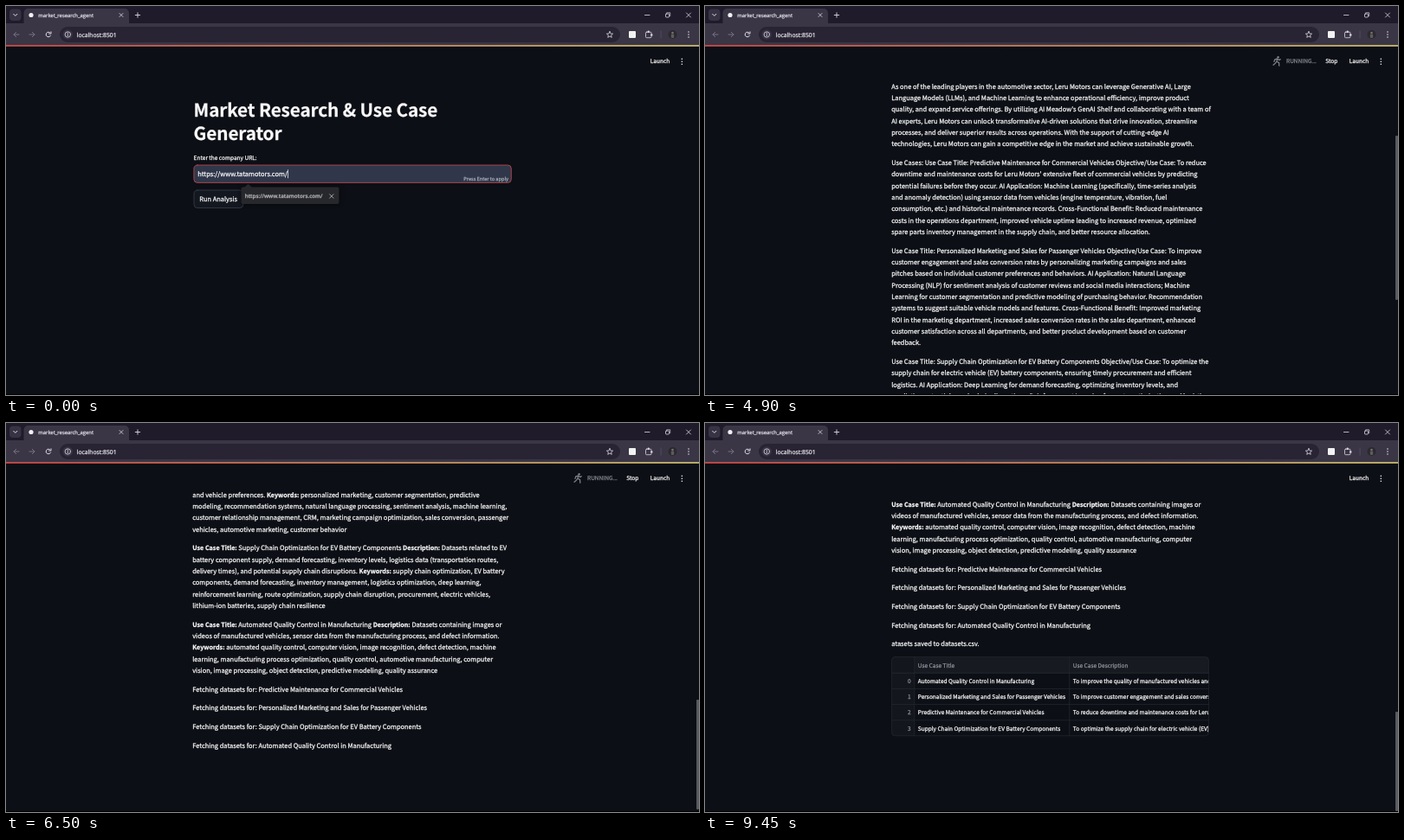
Animation of 800 by 450 pixels, one loop 10 s. Source, as an HTML page with a canvas:

```html
<!DOCTYPE html>
<html lang="en">
<head>
<meta charset="utf-8">
<title>market_research_agent</title>
<style>
html, body { margin: 0; width: 100%; height: 100%; overflow: hidden; background: #0c0f15; }
canvas { display: block; width: 800px; height: 450px; }
</style>
</head>
<body>
<canvas id="stage" width="800" height="450"></canvas>
<script>
const ctx = document.getElementById('stage').getContext('2d');
const LOOP = 10000, STEP = 50;
const BG = '#0c0f15', INK = '#fafafa', RED = '#e0544c', LINK = '#3d95e6';
const LINE = 13.333, GAP = 8.333, BODY = 8.333, STRONG = 8.04, SMALL = 7.29;
const SITE = 'https://www.tatamotors.com/';

// The Latin letters of Noto Sans CJK are drawn 1.117 times larger than their nominal size.
const sans = (px, weight = 400) =>
  `${weight} ${px / 1.117}px "Noto Sans CJK SC", "Noto Sans CJK JP", "Noto Sans CJK KR", "Open Sans", sans-serif`;
const chromeFont = (px, weight = 400) => `${weight} ${px}px "Open Sans", "Noto Sans", sans-serif`;

const INTRO = [
  ['Introductory Paragraph:'],
  ['GenAI & ML Use Cases for Leru Motors'],
  ['As one of the leading players in the automotive sector, Leru Motors can leverage Generative AI, Large',
   'Language Models (LLMs), and Machine Learning to enhance operational efficiency, improve product',
   "quality, and expand service offerings. By utilizing AI Meadow's GenAI Shelf and collaborating with a team of",
   'AI experts, Leru Motors can unlock transformative AI-driven solutions that drive innovation, streamline',
   'processes, and deliver superior results across operations. With the support of cutting-edge AI',
   'technologies, Leru Motors can gain a competitive edge in the market and achieve sustainable growth.']
];
const USE_CASES = [
  ['Use Cases: Use Case Title: Predictive Maintenance for Commercial Vehicles Objective/Use Case: To reduce',
   "downtime and maintenance costs for Leru Motors' extensive fleet of commercial vehicles by predicting",
   'potential failures before they occur. AI Application: Machine Learning (specifically, time-series analysis',
   'and anomaly detection) using sensor data from vehicles (engine temperature, vibration, fuel',
   'consumption, etc.) and historical maintenance records. Cross-Functional Benefit: Reduced maintenance',
   'costs in the operations department, improved vehicle uptime leading to increased revenue, optimized',
   'spare parts inventory management in the supply chain, and better resource allocation.'],
  ['Use Case Title: Personalized Marketing and Sales for Passenger Vehicles Objective/Use Case: To improve',
   'customer engagement and sales conversion rates by personalizing marketing campaigns and sales',
   'pitches based on individual customer preferences and behaviors. AI Application: Natural Language',
   'Processing (NLP) for sentiment analysis of customer reviews and social media interactions; Machine',
   'Learning for customer segmentation and predictive modeling of purchasing behavior. Recommendation',
   'systems to suggest suitable vehicle models and features. Cross-Functional Benefit: Improved marketing',
   'ROI in the marketing department, increased sales conversion rates in the sales department, enhanced',
   'customer satisfaction across all departments, and better product development based on customer',
   'feedback.'],
  ['Use Case Title: Supply Chain Optimization for EV Battery Components Objective/Use Case: To optimize the',
   'supply chain for electric vehicle (EV) battery components, ensuring timely procurement and efficient',
   'logistics. AI Application: Deep Learning for demand forecasting, optimizing inventory levels, and',
   'predicting potential supply chain disruptions. Reinforcement Learning for route optimization and logistics',
   'planning. Cross-Functional Benefit: Reduced procurement costs, improved production planning in the',
   'manufacturing department, lower inventory costs, and a more resilient supply chain for all electric',
   'vehicle programs.'],
  ['Use Case Title: Automated Quality Control in Manufacturing Objective/Use Case: To improve the quality',
   'of manufactured vehicles and reduce defects by automating inspection. AI Application: Computer Vision',
   'for detecting defects in images and videos of parts on the line, with Deep Learning models trained on',
   'labeled examples. Cross-Functional Benefit: Fewer defects in the manufacturing department, lower',
   'warranty costs in the finance department, higher customer satisfaction, and faster feedback for the',
   'engineering teams.']
];
const DATASETS = [
  ['Keywords and descriptions for dataset search:'],
  ['**Use Case Title:** Predictive Maintenance for Commercial Vehicles **Description:** Datasets containing',
   'sensor data from vehicles, maintenance records, failure logs, and operating conditions of commercial',
   'fleets, with time stamps for each of the recorded events. **Keywords:** predictive maintenance, sensor',
   'data, time-series analysis, anomaly detection, machine learning, failure forecasting, regression,',
   'classification, IoT, fleet management, Leru Motors, vehicle diagnostics, maintenance costs, downtime',
   'reduction'],
  ['**Use Case Title:** Personalized Marketing and Sales for Passenger Vehicles **Description:** Datasets containing',
   'customer demographics, purchase history, online behavior, social media interactions, customer reviews,',
   'and vehicle preferences. **Keywords:** personalized marketing, customer segmentation, predictive',
   'modeling, recommendation systems, natural language processing, sentiment analysis, machine learning,',
   'customer relationship management, CRM, marketing campaign optimization, sales conversion, passenger',
   'vehicles, automotive marketing, customer behavior'],
  ['**Use Case Title:** Supply Chain Optimization for EV Battery Components **Description:** Datasets related to EV',
   'battery component supply, demand forecasting, inventory levels, logistics data (transportation routes,',
   'delivery times), and potential supply chain disruptions. **Keywords:** supply chain optimization, EV battery',
   'components, demand forecasting, inventory management, logistics optimization, deep learning,',
   'reinforcement learning, route optimization, supply chain disruption, procurement, electric vehicles,',
   'lithium-ion batteries, supply chain resilience'],
  ['**Use Case Title:** Automated Quality Control in Manufacturing **Description:** Datasets containing images or',
   'videos of manufactured vehicles, sensor data from the manufacturing process, and defect information.',
   '**Keywords:** automated quality control, computer vision, image recognition, defect detection, machine',
   'learning, manufacturing process optimization, quality control, automotive manufacturing, computer',
   'vision, image processing, object detection, predictive modeling, quality assurance']
];
const TITLES = [
  'Predictive Maintenance for Commercial Vehicles',
  'Personalized Marketing and Sales for Passenger Vehicles',
  'Supply Chain Optimization for EV Battery Components',
  'Automated Quality Control in Manufacturing'
];
const TABLE_AT = 6650;
const COLUMNS = [
  { head: 'Use Case Title', width: 179, cells: [TITLES[3], TITLES[1], TITLES[0], TITLES[2]] },
  { head: 'Use Case Description', width: 260, cells: [
    'To improve the quality of manufactured vehicles and reduce defects by automating inspection',
    'To improve customer engagement and sales conversion rates by personalizing marketing',
    "To reduce downtime and maintenance costs for Leru Motors' extensive fleet of vehicles",
    'To optimize the supply chain for electric vehicle (EV) battery components'] },
  { head: 'Keywords', width: 260, cells: [
    'computer vision, deep learning, quality control, defect and image recognition',
    'personalized marketing, customer segmentation, predictive modeling, recommendation systems',
    'predictive maintenance, anomaly detection, machine learning, sensor analysis',
    'demand forecasting, inventory management, logistics optimization, supply chain optimization'] },
  { head: 'Dataset Name', width: 260, cells: [
    ' surface-defect-detection-dataset, Acne | Computer Vision, Bitcoin Hist. KLines | All Intervals',
    'Books Dataset, Boston House Prices, Comprehensive Diabetes Clinical Dataset(100k rows)',
    'Air Passenger Data for Time Series Analysis, Border Crossing Entry Data, Cityscapes Image Pairs',
    'BigBasket Entire Product List (~28K datapoints) , Brewery Operations and Market Analysis'] },
  { head: 'Dataset Links', width: 285, cells: Array(4).fill('https://www.kaggle.com/datasets/') }
];

// Every paragraph gets the time it appears and its place in the document.
const paragraphs = [];
let nextY = 228.2;
function addParagraphs(at, list) {
  for (const lines of list) {
    paragraphs.push({ at, lines, y: nextY });
    nextY += lines.length * LINE + GAP;
  }
}
addParagraphs(750, [[`Extracting content from URL: ${SITE}`]]);
addParagraphs(3050, INTRO);
addParagraphs(4650, USE_CASES);
addParagraphs(5050, DATASETS);
[5400, 5800, 6050, 6350].forEach((at, i) => addParagraphs(at, [[`Fetching datasets for: ${TITLES[i]}`]]));
addParagraphs(TABLE_AT, [['atasets saved to datasets.csv.']]);
const tableY = paragraphs[paragraphs.length - 1].y + 14.4;

// time, scroll offset, scrollbar thumb top and bottom
const PAGE_SCROLL = [
  [0, -20.8, 450, 450], [3050, -20.8, 450, 450], [3050, 0, 77, 448], [4650, 0, 77, 448],
  [4850, 200, 150, 340], [5050, 200, 150, 340], [5400, 790, 311, 445],
  [5800, 790, 311, 445], [5800, 811.7, 314, 446], [6050, 811.7, 314, 446], [6050, 833.3, 317, 446],
  [6350, 833.3, 317, 446], [6350, 855, 320, 447], [TABLE_AT, 855, 320, 447], [TABLE_AT, 994, 334, 449]
];
const TABLE_SCROLL = [[6950, 0], [7400, 655], [7700, 904], [8050, 904], [8750, 0]];

function sample(keys, t) {
  let i = 0;
  while (i < keys.length - 1 && keys[i + 1][0] <= t) i++;
  const a = keys[i], b = keys[i + 1];
  if (!b || t <= a[0]) return a.slice(1);
  const k = (t - a[0]) / (b[0] - a[0]);
  return a.slice(1).map((v, n) => v + (b[n + 1] - v) * k);
}

function rect(x, y, w, h, color, radius = 0, border) {
  ctx.beginPath();
  ctx.roundRect(x, y, w, h, radius);
  if (color) { ctx.fillStyle = color; ctx.fill(); }
  if (border) { ctx.strokeStyle = border; ctx.lineWidth = .8; ctx.stroke(); }
}
function stroke(color, width, ...paths) {
  ctx.strokeStyle = color;
  ctx.lineWidth = width;
  ctx.beginPath();
  for (const p of paths)
    for (let i = 0; i < p.length; i += 2) ctx[i ? 'lineTo' : 'moveTo'](p[i], p[i + 1]);
  ctx.stroke();
}
function circle(x, y, r, fill, line) {
  ctx.beginPath();
  ctx.arc(x, y, r, 0, Math.PI * 2);
  if (fill) { ctx.fillStyle = fill; ctx.fill(); }
  if (line) { ctx.strokeStyle = line; ctx.lineWidth = .8; ctx.stroke(); }
}
// A hairline outline gives small text the soft, slightly heavy look of a scaled screen.
function text(str, x, y, font, color = INK, align = 'left') {
  ctx.font = font;
  ctx.fillStyle = ctx.strokeStyle = color;
  ctx.lineWidth = .25;
  ctx.textAlign = align;
  ctx.fillText(str, x, y);
  ctx.strokeText(str, x, y);
}
function clipped(x, y, w, h, draw) {
  ctx.save();
  ctx.beginPath();
  ctx.rect(x, y, w, h);
  ctx.clip();
  draw();
  ctx.restore();
}
const cross = (x, y, r, color, w = .8) => stroke(color, w, [x - r, y - r, x + r, y + r], [x - r, y + r, x + r, y - r]);
const dots = (x, y, color) => [-3, 0, 3].forEach(d => circle(x, y + d, .8, color));

function richLine(line, x, y) {
  for (const part of line.split(/(\*\*.*?\*\*|https:\S+)/)) {
    const bold = part.startsWith('**'), link = part.startsWith('https:');
    const str = bold ? part.slice(2, -2) : part;
    text(str, x, y, bold ? sans(STRONG, 700) : sans(BODY), link ? LINK : INK);
    const w = ctx.measureText(str).width;
    if (link) rect(x, y + 1, w, .6, LINK);
    x += w;
  }
}

function drawBrowser() {
  const pale = '#dcd9e2', dim = '#787384';
  rect(0, 0, 800, 20, '#1f1b2a');
  rect(0, 20, 800, 26, '#3a3646');
  rect(4, 3.5, 13.5, 13.5, '#383344', 4);
  stroke(pale, 1, [8.7, 9.3, 10.8, 11.4, 12.9, 9.3]);
  rect(20.5, 3, 121.5, 18, '#3a3646', [5, 5, 0, 0]);
  circle(29, 10.5, 2.6, '#f2f2f2');
  text('market_research_agent', 37.3, 12.8, chromeFont(5.87), pale);
  cross(133, 10.5, 2, pale);
  stroke(pale, .9, [149.3, 10.5, 154.7, 10.5], [152, 7.8, 152, 13.2]);
  stroke(pale, .8, [737.5, 10.5, 743, 10.5]);
  rect(761.5, 9, 4, 4, null, .8, pale);
  stroke(pale, .7, [762.8, 7.8, 766.7, 7.8, 766.7, 11.7]);
  cross(788, 10.5, 2.5, pale);

  stroke(dim, 1, [15, 33, 9, 33], [11.7, 30.3, 9, 33, 11.7, 35.7]);
  stroke(dim, 1, [27, 33, 33, 33], [30.3, 30.3, 33, 33, 30.3, 35.7]);
  ctx.beginPath();
  ctx.arc(49, 33, 2.8, .4, 5.4);
  ctx.strokeStyle = pale;
  ctx.lineWidth = 1;
  ctx.stroke();
  stroke(pale, 1, [52, 29.8, 52, 32, 49.6, 32]);
  rect(62, 24, 647, 18, '#282433', 9);
  circle(71.3, 33, 5.8, '#383344');
  circle(71.3, 33, 3.2, null, pale);
  stroke(pale, .8, [71.3, 32.7, 71.3, 34.8], [71.3, 31, 71.3, 31.7]);
  text('localhost:8501', 81.7, 35.6, chromeFont(6.82), '#e6e3ea');
  const star = [];
  for (let i = 0; i <= 10; i++) {
    const a = i * Math.PI / 5 - Math.PI / 2, r = i % 2 ? 1.7 : 3.8;
    star.push(697 + r * Math.cos(a), 33.3 + r * Math.sin(a));
  }
  stroke(pale, .8, star);
  rect(719, 29, 8, 8, '#f2f2f2', 1);
  rect(738.5, 30.2, 6.5, 6.5, null, 1, pale);
  circle(741.7, 29.8, 1.2, pale);
  circle(745.3, 33.4, 1.2, pale);
  rect(755.7, 28.5, .7, 9, '#5a5469');
  circle(769.5, 33, 5, '#2b2930');
  circle(769.5, 31, 1.3, '#77706d');
  rect(767.8, 32.5, 3.4, 4.5, '#5d5c55', 1);
  dots(788, 33, pale);

  const glow = ctx.createLinearGradient(0, 0, 800, 0);
  glow.addColorStop(0, '#e8504c');
  glow.addColorStop(1, '#e8d878');
  rect(0, 45.2, 800, 1.6, glow);
}

// Limbs are relative to the hip; the first pair is the head.
const POSES = [
  [[1.6, -5], [.8, -3.4, 0, 0], [-3.6, -1, -2, -3, .8, -3.2, 2, -1.2, 4, -1.4], [-3.8, 3, -1.2, 2.6, 0, 0, 2, 2, 1.4, 5.4]],
  [[0, -5], [0, -3.4, 0, 0], [-4.2, -3.4, 4.2, -3.4], [-1.2, 5.4, -1, 0, 1, 0, 1.2, 5.4]],
  [[1.6, -5], [.8, -3.4, 0, 0], [-3, .2, -2.2, -2.4, .8, -3.2, 2.6, -1.6, 4.2, -2.6], [-4, 4, -1.6, 2, 0, 0, 2.6, 1.4, 2.8, 5]],
  [[1.8, -5], [.9, -3.4, 0, 0], [-3.4, -1.4, -1.8, -3.2, .9, -3.2, 1.8, -.8, 3.8, -1], [-3.4, 5, -.6, 2.8, 0, 0, 2.2, 1.6, 2.4, 5]]
];
function drawStatus(t) {
  const grey = '#7d8086';
  const [head, ...limbs] = POSES[Math.floor(t / STEP) % POSES.length];
  ctx.save();
  ctx.translate(660, 64.2);
  circle(head[0], head[1], 1.2, grey);
  stroke(grey, 1.3, ...limbs);
  ctx.restore();
  text('RUNNING...', 671, 66.3, sans(SMALL), '#85888e');
  text('Stop', 716.3, 66.3, sans(SMALL));
}

function drawForm(x, y, t) {
  ctx.letterSpacing = '-0.11px';
  text('Market Research & Use Case', x, y + 106.8, sans(23.15, 700));
  text('Generator', x, y + 134.3, sans(23.15, 700));
  ctx.letterSpacing = '0px';
  text('Enter the company URL:', x, y + 157.2, sans(SMALL));

  const focused = t < 150, hot = t >= 250;
  rect(x + .3, y + 163.2, 366.4, 20.4, focused ? '#30374a' : '#262730', 4, focused ? '#c64b50' : null);
  text(SITE, x + 4.6, y + 176.4, sans(BODY));
  if (focused) rect(x + 5 + ctx.measureText(SITE).width, y + 168.5, .7, 10, INK);
  if (t < 100) text('Press Enter to apply', x + 363.3, y + 181, sans(6.25), '#a9adb8', 'right');

  rect(x + .4, y + 192.2, 56.8, 20.6, hot ? null : '#131720', 4, hot ? RED : '#3d4047');
  text('Run Analysis', x + 6.6, y + 205.4, sans(BODY), hot ? RED : INK);
}

function drawPopup() {
  ctx.save();
  ctx.shadowColor = 'rgba(0,0,0,.6)';
  ctx.shadowBlur = 5;
  rect(271.5, 209.5, 113, 19.5, '#27282c', 2);
  ctx.restore();
  ctx.fillStyle = '#27282c';
  ctx.beginPath();
  ctx.moveTo(275, 210);
  ctx.lineTo(279.5, 205.8);
  ctx.lineTo(284, 210);
  ctx.fill();
  text(SITE, 275.7, 222.4, chromeFont(6.22, 600), '#b3b3b6');
  cross(375.8, 220, 2.2, '#c4c4c7');
}

function drawTable(x, y, t) {
  const width = 366.6, height = 92, indexW = 26.6, rowH = 18.2, headH = 19;
  const rule = '#23262e', muted = '#8e929b';
  const rowY = i => y + headH + i * rowH;
  const [scroll] = sample(TABLE_SCROLL, t);

  ctx.save();
  ctx.beginPath();
  ctx.roundRect(x, y, width, height, 4);
  ctx.clip();
  rect(x, y, width, headH, '#171a21');
  rect(x, y, indexW, height, '#13161d');
  clipped(x + indexW, y, width - indexW, height, () => {
    let left = x + indexW - scroll;
    for (const { head, width: w, cells } of COLUMNS) {
      clipped(left, y, w, height, () => {
        text(head, left + 4, y + 12.6, sans(SMALL), muted);
        cells.forEach((cell, i) => text(cell, left + 4, rowY(i) + 11.8, sans(SMALL)));
      });
      left += w;
      rect(left - .4, y, .8, height, rule);
    }
  });
  rect(x + indexW - .4, y, .8, height, rule);
  for (let i = 0; i < 4; i++) {
    rect(x, rowY(i) - .4, width, .8, rule);
    text(String(i), x + 22.3, rowY(i) + 11.8, sans(SMALL), muted, 'right');
  }
  const hover = t >= 6950 && t < 8900;
  if (hover) rect(x + scroll * .288, y + height - 3.2, 105, 2.8, '#6b6d72', 1.4);
  ctx.restore();
  rect(x + .4, y + .4, width - .8, height - .8, null, 4, rule);

  if (hover) {
    const c = '#d5d6d9', iy = y - 8.5;
    stroke(c, .9, [x + 332, iy - 2.8, x + 332, iy + 1], [x + 330, iy - .8, x + 332, iy + 1.2, x + 334, iy - .8],
      [x + 329.5, iy + 1, x + 329.5, iy + 2.6, x + 334.5, iy + 2.6, x + 334.5, iy + 1]);
    circle(x + 345.4, iy - .6, 1.9, null, c);
    stroke(c, .9, [x + 346.8, iy + .8, x + 348.6, iy + 2.6]);
    for (const sx of [-1, 1]) for (const sy of [-1, 1]) {
      const cx = x + 359.7 + sx * 2.4, cy = iy + sy * 2.4;
      stroke(c, .9, [cx - sx * 1.6, cy, cx, cy, cx, cy - sy * 1.6]);
    }
  }
}

function drawPage(t) {
  const [scroll, thumbTop, thumbBottom] = sample(PAGE_SCROLL, t);
  const x = t < 3050 ? 216.6 : 215.2;
  clipped(0, 77, 800, 372, () => {
    if (scroll < 200) drawForm(x, -scroll, t);
    for (const { at, lines, y } of paragraphs) {
      if (t < at) continue;
      lines.forEach((line, i) => {
        const ly = y + i * LINE - scroll;
        if (ly > 60 && ly < 465) richLine(line, x, ly + 2.5);
      });
    }
    if (t >= TABLE_AT) drawTable(x, tableY - scroll, t);
    if (t < 50) drawPopup();
  });
  if (thumbTop < thumbBottom) rect(797, thumbTop, 3, thumbBottom - thumbTop, '#585b62', 1);
  if (t >= 750 && t < 6950) drawStatus(t);
  text('Launch', 743.8, 66.3, sans(SMALL));
  dots(780.3, 64.3, INK);
}

function frame(now) {
  const t = Math.floor(now % LOOP / STEP) * STEP;
  ctx.textRendering = 'geometricPrecision';
  ctx.lineCap = ctx.lineJoin = 'round';
  rect(0, 0, 800, 450, BG);
  drawPage(t);
  drawBrowser();
  rect(0, 448.9, 800, 1.1, '#000');
  requestAnimationFrame(frame);
}
requestAnimationFrame(frame);
</script>
</body>
</html>
```
